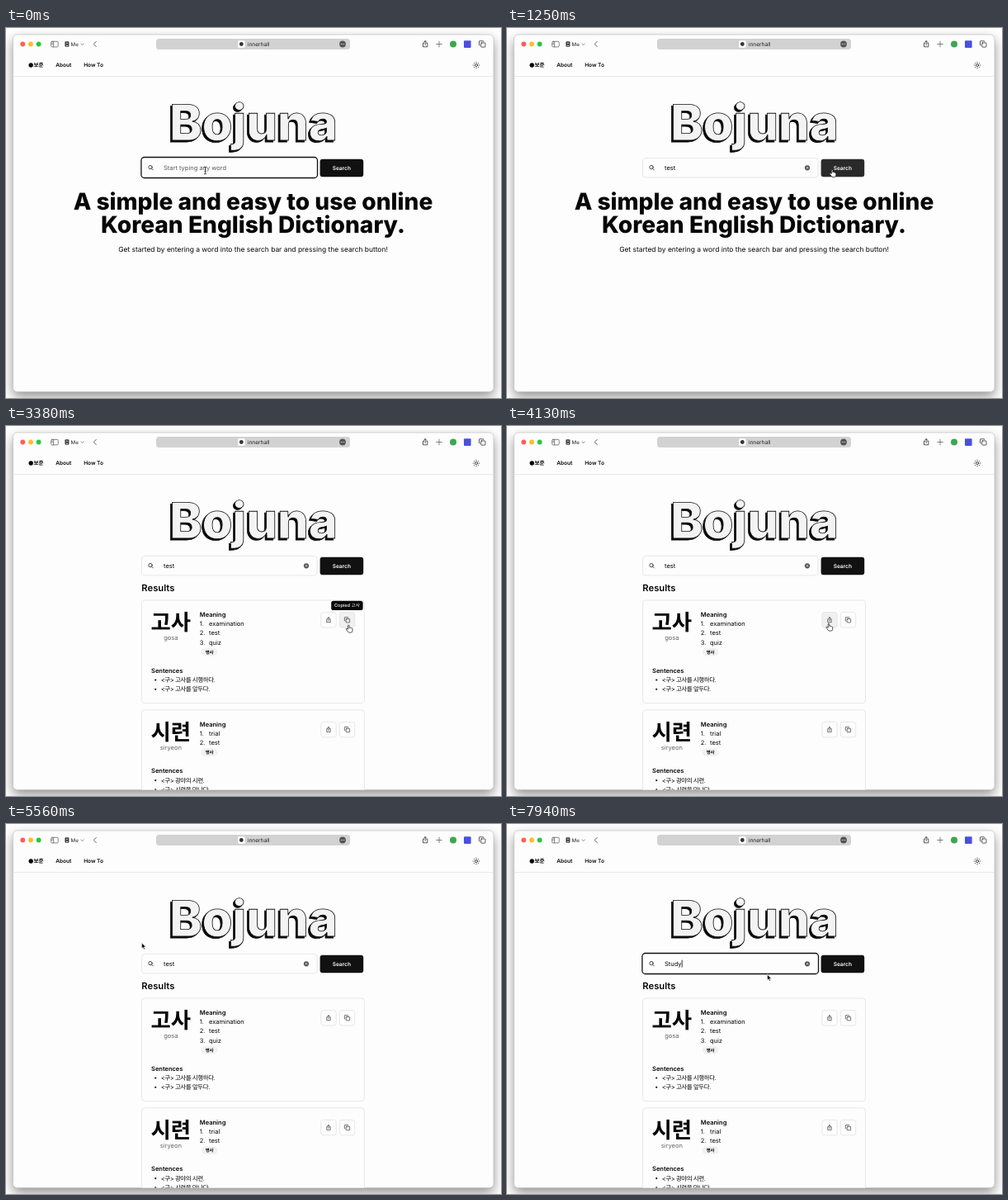
Write an HTML page that moves like this. It is 600 px wide and 448 px high and loops after 8 s.

```html
<!DOCTYPE html>
<html lang="ko">
<head>
<meta charset="utf-8">
<title>Dictionary search</title>
<style>
html, body { margin: 0; width: 100%; height: 100%; overflow: hidden; background: #fff; }
svg { display: block; width: 600px; height: 448px; font: 7.5px Inter, 'Noto Sans CJK KR', 'Noto Sans CJK', sans-serif; fill: #060607; text-rendering: geometricPrecision; }
text { white-space: pre; }
.b { font-weight: 600; }
.nav { font-size: 6.5625px; font-weight: 600; }
.mid { text-anchor: middle; }
.line { fill: none; stroke: #222; stroke-width: 2; stroke-linecap: round; stroke-linejoin: round; }
.bar { stroke: #666; }
.box { fill: #fdfdfd; stroke: #e2e2e2; stroke-width: .8; }
.tip { font-size: 5.625px; font-weight: 500; fill: #fff; text-anchor: middle; }
.h1 { font-size: 28.125px; font-weight: 800; text-anchor: middle; }
.logo { font-size: 60px; font-weight: 800; letter-spacing: -.005em; text-anchor: middle; stroke: #111; stroke-width: .8; }
.word { font-size: 26.4px; font-weight: 700; }
.ko { letter-spacing: -.46px; }
</style>
</head>
<body>
<svg viewBox="0 0 600 448">
  <defs>
    <clipPath id="win"><rect x="8.5" y="8" width="582.5" height="432.5" rx="5"/></clipPath>
    <g id="share" class="line"><path d="M8 9H5v12h14V9h-3M12 15V2M8 6l4-4 4 4"/></g>
    <g id="copy" class="line"><rect x="8" y="8" width="14" height="14" rx="2"/><path d="M4 16H3a1 1 0 0 1-1-1V3a1 1 0 0 1 1-1h12a1 1 0 0 1 1 1v1"/></g>
  </defs>
  <rect x="8.5" y="8" width="582.5" height="432.5" rx="5" fill="#fdfdfd" stroke="#bbb" stroke-width=".6" style="filter:drop-shadow(0 6px 7px rgba(0,0,0,.42))"/>

  <g clip-path="url(#win)">
    <!-- browser bar -->
    <circle cx="20.3" cy="19.5" r="2.9" fill="#ff5f57"/>
    <circle cx="30" cy="19.5" r="2.9" fill="#febc2e"/>
    <circle cx="39.6" cy="19.5" r="2.9" fill="#28c840"/>
    <g class="line bar" style="stroke-width:.8">
      <rect x="54.6" y="16.3" width="8.6" height="6.6" rx="1.2"/>
      <path d="M57.6 16.3v6.6M55.7 18h.8M55.7 19.5h.8M91 19l1.6 1.6L94.2 19"/>
      <path d="M109.3 16.4l-3.1 3.1 3.1 3.1" stroke="#333"/>
      <path d="M525 16.2v6.6M521.7 19.5h6.6"/>
    </g>
    <rect x="71.4" y="16.2" width="5" height="6.6" rx="1" fill="#444"/>
    <path d="M72.8 21.3h2.2M73 18.3h1.8" stroke="#fff" stroke-width=".8"/>
    <text x="78.6" y="21.8" font-size="6.2" font-weight="500" fill="#444">Me</text>
    <rect x="182" y="13" width="235" height="13" rx="3.5" fill="#d2d2d2"/>
    <rect x="281" y="15.2" width="8.6" height="8.6" rx="1.6" fill="#fff"/>
    <circle cx="285.3" cy="19.5" r="2.4" fill="#333"/>
    <text x="292.8" y="21.9" font-size="6.6" fill="#222">innerhall</text>
    <circle cx="408" cy="19.5" r="3.9" fill="#555"/>
    <path d="M406.2 19.5h.01M408 19.5h.01M409.8 19.5h.01" stroke="#eee" stroke-linecap="round"/>
    <use href="#share" transform="translate(503.6 14.8) scale(.38)"/>
    <circle cx="542" cy="19.5" r="4" fill="#3fa650"/>
    <rect x="555" y="15.3" width="8.6" height="8.6" rx="1" fill="#4b4fe0"/>
    <use href="#copy" transform="translate(572.8 15) scale(.37)"/>

    <!-- site header -->
    <circle cx="30.2" cy="45" r="2.7"/>
    <text class="nav" x="33.6" y="47.3">보준</text>
    <text class="nav" x="60.2" y="47.3">About</text>
    <text class="nav" x="94.2" y="47.3">How To</text>
    <g class="line" transform="translate(565.4 40.4) scale(.385)">
      <circle cx="12" cy="12" r="4"/>
      <path d="M12 2v2M12 20v2M2 12h2M20 12h2M5 5l1.4 1.4M17.6 17.6L19 19M5 19l1.4-1.4M17.6 6.4L19 5"/>
    </g>
    <path d="M8 58.5h583" stroke="#e4e4e4" stroke-width=".8"/>

    <text class="logo" x="297.8" y="138.2">Bojuna</text>
    <text class="logo" x="299.8" y="136.2" fill="#f3f3f3">Bojuna</text>

    <!-- search form -->
    <rect class="box" x="164.5" y="157.3" width="212.5" height="23.6" rx="3.5"/>
    <rect id="ring" x="163.9" y="156.5" width="213.6" height="25" rx="3.8" fill="#fdfdfd" stroke="#111" stroke-width="1.3"/>
    <g class="line" style="stroke-width:.8"><circle cx="175" cy="168.6" r="2.2"/><path d="M176.7 170.3l1.6 1.6"/></g>
    <rect id="mark" x="191" y="164" height="10" fill="#b3d7ff"/>
    <text id="hint" x="191" y="171.8" fill="#5c5c5f">Start typing any word</text>
    <text id="typed" x="191" y="171.8"></text>
    <rect id="caret" y="164.6" width=".8" height="9"/>
    <g id="clear"><circle cx="364" cy="169.3" r="3.1" fill="#555"/><path d="M362.8 168.1l2.4 2.4m0-2.4l-2.4 2.4" stroke="#fff" stroke-width=".7"/></g>
    <rect id="find" x="380.6" y="158.7" width="52.6" height="21.5" rx="3"/>
    <text class="nav mid" x="406.8" y="171.6" style="fill:#fff">Search</text>

    <g id="intro">
      <text class="h1" x="299.5" y="220">A simple and easy to use online</text>
      <text class="h1" x="299.5" y="248.1">Korean English Dictionary.</text>
      <text class="mid" x="299.5" y="270.7" font-size="8.4375">Get started by entering a word into the search bar and pressing the search button!</text>
    </g>
    <g id="results">
      <text class="b" x="164.3" y="199.8" font-size="11.25">Results</text>
      <g id="cards"></g>
      <g id="tipCopy"><rect x="394.2" y="211.7" width="38.4" height="11.4" rx="2.6"/><text class="tip" x="413.4" y="219.4">Copied 고사</text></g>
      <g id="tipShare"><rect x="371.8" y="211.7" width="38.6" height="11.4" rx="2.6"/><text class="tip" x="391.1" y="219.4">Copied link!</text></g>
    </g>
  </g>

  <g id="cursor">
    <path id="arrow" d="M0 0v7.2l1.7-1.5 1.1 2.5 1.3-.6-1.1-2.4h2.2z" stroke="#fff" stroke-width=".7"/>
    <path id="beam" d="M-1.5-4.4q1.5 0 1.5 1.2q0-1.2 1.5-1.2M0-3.2v6.4M-1.5 4.4q1.5 0 1.5-1.2q0 1.2 1.5 1.2M-1 1h2" fill="none" stroke="#222" stroke-width=".8"/>
    <path id="hand" d="M-1.2.8q0-.9.8-.9t.8.9v2.6l.4-.5q.8-.2 1.1.4q.9-.3 1.2.4q1.1-.2 1.2.8v2.2q0 2.2-2.2 2.2h-1.6q-1.2 0-1.9-1.1l-2.1-3q0-1 .9-.8l1.4 1z" fill="#fff" stroke="#111" stroke-width=".7"/>
  </g>
</svg>
<script>
const $ = id => document.getElementById(id);
const show = (id, on) => $(id).style.display = on ? '' : 'none';
const within = (t, a, b) => t >= a && t < b;

function card(y, word, roman, meanings, sentences) {
  const line = 11.25, low = y + (meanings.length - 3) * line;
  const button = (x, icon) => `<rect class="box" id="${icon}${y}" x="${x}" y="${y + 14.6}" width="18.4" height="18.4" rx="2.8"/>
    <use href="#${icon}" transform="translate(${x + 5.4} ${y + 20}) scale(.315)"/>`;
  return `<rect class="box" x="164.5" y="${y}" width="270" height="124.6" rx="3.8"/>
    <text class="word mid" x="199.7" y="${y + 36}">${word}</text>
    <text class="mid" x="199.8" y="${y + 48}" fill="#666">${roman}</text>
    <text class="b" x="234.8" y="${y + 20}">Meaning</text>` +
    meanings.map((m, i) => `<text x="234.8" y="${y + 31.2 + i * line}">${i + 1}.</text>
      <text x="246" y="${y + 31.2 + i * line}">${m}</text>`).join('') +
    `<rect x="236.8" y="${low + 57.7}" width="19.6" height="9.8" rx="4.9" fill="#f1f1f1"/>
    <text class="b mid" x="246.6" y="${low + 64.7}" font-size="5.4">명사</text>
    <text class="b" x="176" y="${low + 87.8}">Sentences</text>` +
    sentences.map((s, i) => `<circle cx="181.2" cy="${low + 96.5 + i * line}" r="1.1"/>
      <text class="ko" x="187.8" y="${low + 99.1 + i * line}">&lt;구&gt; ${s}</text>`).join('') +
    button(381.8, 'share') + button(404.3, 'copy');
}
$('cards').innerHTML =
  card(211, '고사', 'gosa', ['examination', 'test', 'quiz'], ['고사를 시행하다.', '고사를 앞두다.']) +
  card(343.8, '시련', 'siryeon', ['trial', 'test'], ['광야의 시련.', '시련을 만나다.']);

// pointer route: time, x, y
const route = [
  [0, 241.5, 172.5], [620, 241.5, 172.5], [800, 312, 180], [970, 400, 163], [1130, 394.5, 171.5],
  [2400, 394.5, 171.5], [2880, 415.7, 241.2], [3600, 415.7, 241.2], [3880, 390.4, 239.2],
  [4880, 390.4, 239.2], [5310, 164.4, 143.8], [5600, 164.4, 143.8], [5810, 217, 169.5],
  [7800, 217, 169.5], [7937, 315.4, 182], [8000, 315.4, 182]
];
function pointer(t) {
  const i = route.findIndex(p => p[0] > t), [a, x, y] = route[i - 1], [b, u, v] = route[i];
  const k = (t - a) / (b - a), e = k * k * (3 - 2 * k);
  return [x + (u - x) * e, y + (v - y) * e];
}

const keys = (word, times, t) => word.slice(0, times.filter(s => t >= s).length);

function draw(t) {
  const [x, y] = pointer(t);
  const over = (l, top, w, h) => within(x, l, l + w) && within(y, top, top + h);
  const focus = t < 1190 || t >= 6000, marked = within(t, 6190, 7000);
  const text = t < 7000 ? keys('test', [120, 380, 440, 560], t)
    : keys('Study', [7000, 7250, 7375, 7500, 7690], t);

  $('typed').textContent = text;
  const width = text ? $('typed').getComputedTextLength() : 0;
  $('mark').setAttribute('width', width);
  $('caret').setAttribute('x', 191.2 + width);
  show('ring', focus);
  show('mark', marked);
  show('caret', focus && text && !marked);
  show('hint', !text);
  show('clear', text);

  const found = t >= 1380;
  show('intro', !found);
  show('results', found);
  $('find').style.fill = over(381, 158, 52, 22) ? '#2a2a2b' : '#111';
  $('copy211').style.fill = over(404, 225, 19, 19) ? '#f0f0f0' : '';
  $('share211').style.fill = over(381, 225, 19, 19) ? '#f0f0f0' : '';
  show('tipCopy', within(t, 3180, 3690));
  show('tipShare', within(t, 4180, 4930));

  const hand = within(t, 1040, 1440) || within(t, 2930, 3620) || within(t, 3930, 4900);
  const beam = !hand && over(186, 157, 191, 24);
  show('hand', hand);
  show('beam', beam);
  show('arrow', !hand && !beam);
  show('cursor', !within(t, 120, 620) && !within(t, 7000, 7800));
  $('cursor').setAttribute('transform', `translate(${x} ${y})`);
}

function loop() {
  draw(performance.now() % 8000);
  requestAnimationFrame(loop);
}
loop();
</script>
</body>
</html>
```
